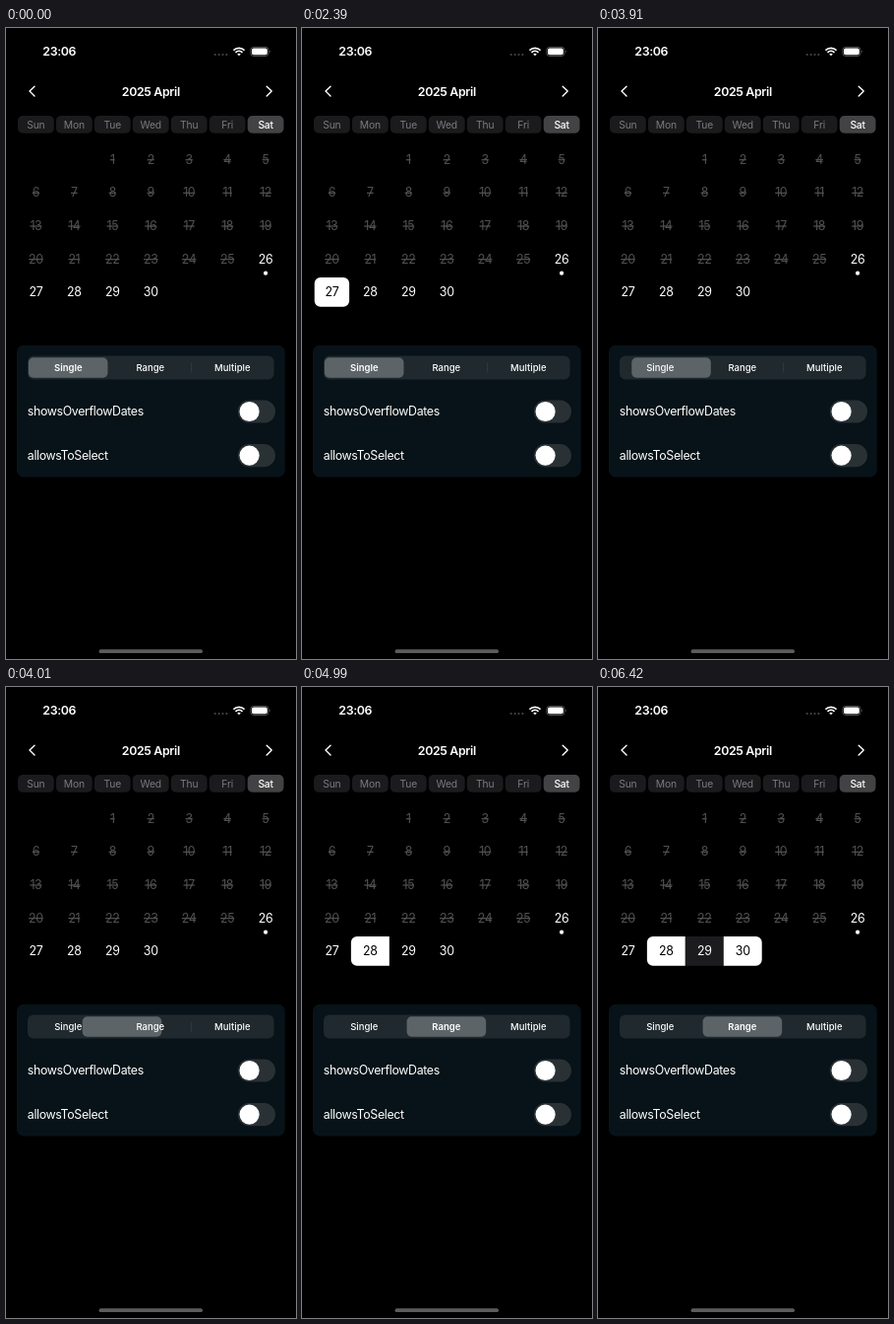
Write an HTML page that moves like this. It is 295 px wide and 640 px high and loops after 8 s.

```html
<!DOCTYPE html>
<html lang="en">
<head>
<meta charset="utf-8">
<title>Calendar selection</title>
<style>
  html, body { margin: 0; width: 100%; height: 100%; overflow: hidden; background: #000; }
  svg { display: block; }
  text { font-family: Inter, Roboto, sans-serif; font-size: 12.4px; letter-spacing: -0.36px; fill: #fff; }
  .mid { text-anchor: middle; }
  .bold { font-weight: 600; }
  .week { font-size: 10.3px; letter-spacing: -0.2px; }
  .seg { font-size: 9.5px; letter-spacing: 0; font-weight: 500; }
  .past { fill: #505052; text-decoration: line-through; }
</style>
</head>
<body>
<svg id="stage" width="295" height="640" viewBox="0 0 295 640">
  <rect width="295" height="640"/>
  <g id="status">
    <text class="bold mid" x="54.2" y="28.4">23:06</text>
    <g fill="#48484a">
      <circle cx="212.7" cy="27" r="1.1"/><circle cx="216.6" cy="27" r="1.1"/>
      <circle cx="220.5" cy="27" r="1.1"/><circle cx="224.4" cy="27" r="1.1"/>
    </g>
    <g fill="none" stroke="#fff" stroke-width="1.7">
      <path d="M231.4 22.6a8 8 0 0 1 11.2 0"/>
      <path d="M233.5 24.9a5 5 0 0 1 7 0"/>
    </g>
    <path d="M235.2 26.5a2.6 2.6 0 0 1 3.6 0L237 28.3z" fill="#fff"/>
    <rect x="248.8" y="19.4" width="18.2" height="9" rx="3" fill="none" stroke="#6a6a6c" stroke-width=".8"/>
    <rect x="250" y="20.6" width="15.8" height="6.6" rx="1.9" fill="#fff"/>
    <path d="M268.2 22.5q1.4 1.4 0 2.8z" fill="#6a6a6c"/>
  </g>
  <g id="header">
    <path d="M29 59.2L24 64.1L29 69M265.2 59.2L270.2 64.1L265.2 69" fill="none" stroke="#fff"
      stroke-width="1.4" stroke-linecap="round" stroke-linejoin="round"/>
    <text class="bold mid" x="147.3" y="68.6">2025 April</text>
  </g>
  <g id="week"></g>
  <g id="days"></g>
  <rect x="11" y="321.8" width="272.8" height="133.8" rx="7" fill="#071318"/>
  <g id="segments">
    <rect x="22" y="332.5" width="250.6" height="24" rx="6" fill="#1f292e"/>
    <path id="divider" d="M188.6 339.5v10" stroke="#343d42" stroke-width=".9"/>
    <rect id="thumb" y="334.2" width="80.6" height="20.6" rx="5" fill="#5d6468"/>
  </g>
  <g id="toggles"></g>
  <rect x="94.6" y="630.3" width="105.4" height="3.8" rx="1.9" fill="#5c5c5e"/>
</svg>
<script>
const LOOP = 8000;
const COL = 38.95, ROW = 33.65, X0 = 30.4, Y0 = 133.2;
const NS = 'http://www.w3.org/2000/svg';
const $ = id => document.getElementById(id);

function add(parent, tag, attrs, label) {
  const el = document.createElementNS(NS, tag);
  for (const key in attrs) el.setAttribute(key, attrs[key]);
  if (label !== undefined) el.textContent = label;
  parent.appendChild(el);
  return el;
}

['Sun', 'Mon', 'Tue', 'Wed', 'Thu', 'Fri', 'Sat'].forEach((name, i) => {
  const x = X0 + i * COL, today = i === 6;
  add($('week'), 'rect', { x: x - 18.4, y: 89, width: 36.8, height: 17.8, rx: 5, fill: today ? '#434345' : '#1b1b1d' });
  add($('week'), 'text', { class: 'week mid', x, y: 101.6, style: today ? 'font-weight:500' : 'fill:#7b7b7f' }, name);
});

// April 2025 starts on a Tuesday
const days = [];
for (let n = 1; n <= 30; n++) {
  const slot = n + 1, x = X0 + (slot % 7) * COL, y = Y0 + Math.floor(slot / 7) * ROW;
  const back = add($('days'), 'path', {});
  if (n === 26) add($('days'), 'circle', { cx: x, cy: y + 14.5, r: 2.1, fill: '#fff' });
  const text = add($('days'), 'text', { class: n < 26 ? 'mid past' : 'mid', x, y: y + 4.5 }, n);
  days[n] = { x, y, back, text };
}

const labels = ['Single', 'Range', 'Multiple'].map((name, i) =>
  add($('segments'), 'text', { class: 'seg mid', x: 63.3 + i * 83.5, y: 348 }, name));

['showsOverflowDates', 'allowsToSelect'].forEach((name, i) => {
  const y = 389 + i * 44.6, g = $('toggles');
  add(g, 'text', { x: 21.8, y: y + 4.3 }, name);
  add(g, 'rect', { x: 235.8, y: y - 11.6, width: 38.2, height: 23.2, rx: 11.6, fill: '#2a3135' });
  add(g, 'circle', { cx: 247.6, cy: y, r: 10.1, fill: '#fff' });
});

// Box with separately rounded left and right sides
function box(x, y, w, h, left, right) {
  const arc = (r, dx, dy) => `a${r} ${r} 0 0 1 ${dx} ${dy}`;
  return `M${x + left} ${y}h${w - left - right}` + arc(right, right, right) +
    `v${h - 2 * right}` + arc(right, -right, right) + `h${left + right - w}` +
    arc(left, -left, -left) + `v${2 * left - h}` + arc(left, left, -left) + 'z';
}

const shapes = {
  single: { half: 17.7, left: 6, right: 6, fill: '#fff' },
  start: { half: COL / 2, left: 6, right: 0, fill: '#fff' },
  middle: { half: COL / 2, left: 0, right: 0, fill: '#1c1c1e' },
  end: { half: COL / 2, left: 0, right: 6, fill: '#fff' }
};

// Selection by start time
const selections = [
  [0, {}],
  [1350, { 26: 'single' }],
  [2390, { 27: 'single' }],
  [3010, { 28: 'single' }],
  [3910, {}],
  [4990, { 28: 'start' }],
  [5680, { 28: 'start', 29: 'end' }],
  [6420, { 28: 'start', 29: 'middle', 30: 'end' }]
];
const slideTimes = [3910, 4010, 4120, 4230, 4340];

const latest = (list, t) => list.filter(item => item <= t).pop();

// Critically damped slide, held between its steps
function slide(t) {
  const step = latest(slideTimes, t);
  if (!step) return 0;
  if (step === 4340) return 1;
  const k = (step - 3870) * 0.016;
  return 1 - (1 + k) * Math.exp(-k);
}

function render(t) {
  const picked = selections.filter(([at]) => at <= t).pop()[1];
  for (let n = 26; n <= 30; n++) {
    const { x, y, back, text } = days[n], shape = shapes[picked[n]];
    back.setAttribute('d', shape ? box(x - shape.half, y - 14.9, shape.half * 2, 29.8, shape.left, shape.right) : '');
    back.setAttribute('fill', shape ? shape.fill : 'none');
    text.style.fill = shape && shape.fill === '#fff' ? '#000' : '#fff';
  }
  const p = slide(t);
  $('thumb').setAttribute('x', 22.9 + p * 83.7);
  $('divider').setAttribute('opacity', Math.min(1, Math.max(0, (1 - p) / 0.34)));
  labels[0].style.fontWeight = p === 0 ? 600 : 500;
  labels[1].style.fontWeight = p === 1 ? 600 : 500;
}

function tick() {
  render(performance.now() % LOOP);
  requestAnimationFrame(tick);
}
tick();
</script>
</body>
</html>
```
